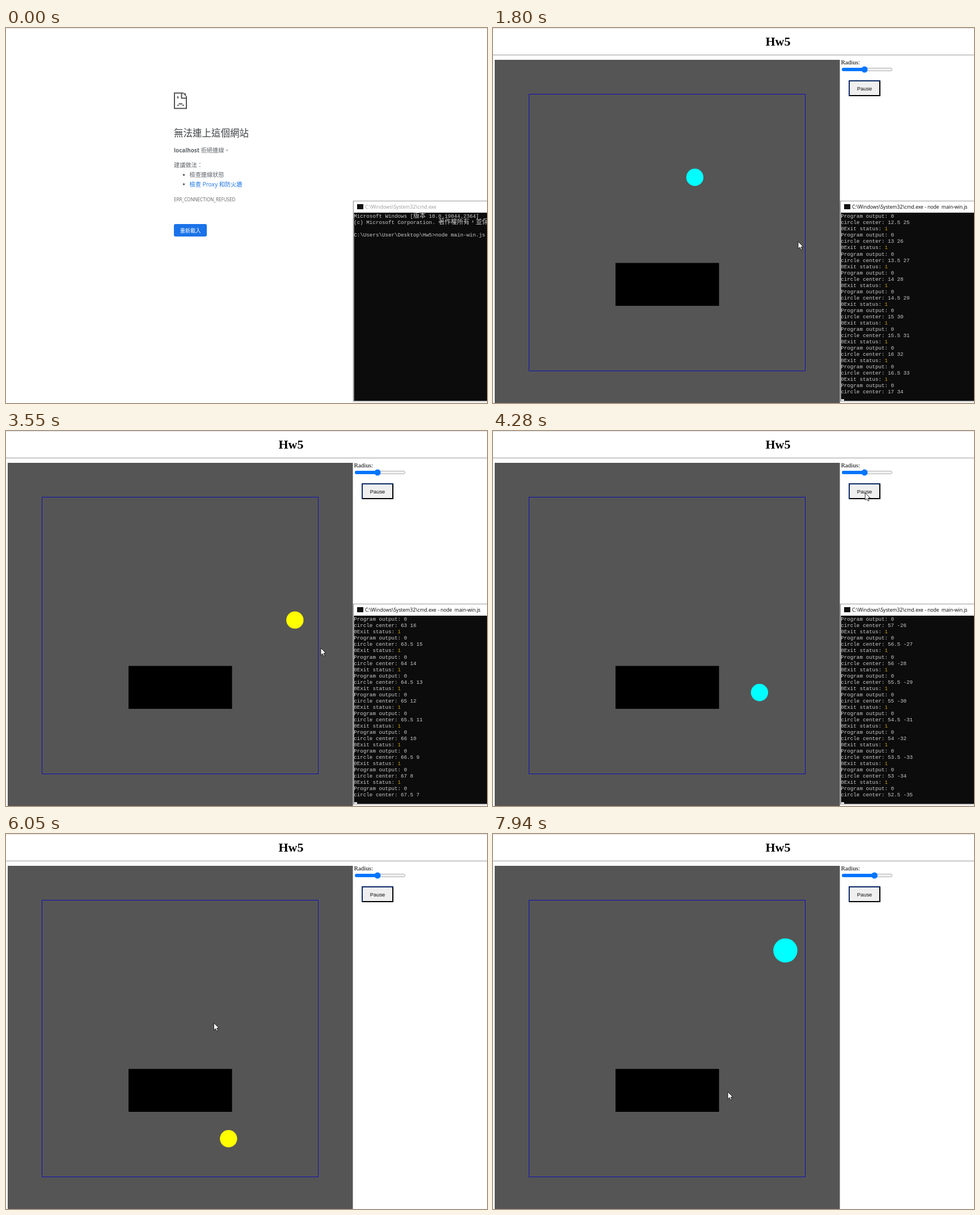
An HTML page for the animation above (8000 ms loop, 848 by 660 pixels).

```html
<!DOCTYPE html>
<html lang="zh-Hant">
<head>
<meta charset="utf-8">
<title>Hw5</title>
<style>
html, body { margin: 0; width: 100%; height: 100%; overflow: hidden; background: #fff; }
svg { display: block; width: 848px; height: 660px; }
text { white-space: pre; }
.ui { font-family: "Open Sans", "Noto Sans CJK TC", "Noto Sans CJK", sans-serif; }
.serif { font-family: "Liberation Serif", serif; }
#error { fill: #5f6368; font-size: 10.2px; }
#rows { font: 9.2px "Liberation Mono", "Noto Sans CJK TC", "Noto Sans CJK", monospace; fill: #ccc; }
</style>
</head>
<body>
<svg viewBox="0 0 848 660">
  <rect width="848" height="660" fill="#fff"/>
  <rect width="848" height="1" fill="#dcdcdc"/>

  <g id="error" class="ui">
    <g fill="none" stroke="#535353" stroke-width="2">
      <path d="M313 114.5H297V141.5H318V119.5M309.5 114V123.5H318M313 116H316V119.5"/>
      <path d="M303 120V124M302 136H304.5M304.5 133.5H311M311 136H313.5"/>
    </g>
    <text x="296" y="191" font-size="16.5" font-weight="300" fill="#3c4043">無法連上這個網站</text>
    <text x="296" y="218.5"><tspan font-weight="700" font-size="9.9">localhost</tspan> 拒絕連線。</text>
    <text x="296" y="245">建議做法：</text>
    <circle cx="313.5" cy="258.5" r="1.8"/>
    <text x="323.5" y="262">檢查連線狀態</text>
    <circle cx="313.5" cy="275" r="1.8"/>
    <text x="323.5" y="278.5" fill="#1a73e8">檢查 Proxy 和防火牆</text>
    <text x="296" y="304.5" font-size="8.1">ERR_CONNECTION_REFUSED</text>
    <rect x="296" y="345" width="58" height="22" rx="3" fill="#1a73e8"/>
    <text x="325" y="359.5" font-size="9.2" font-weight="500" fill="#fff" text-anchor="middle">重新載入</text>
  </g>

  <g id="page">
    <text class="serif" x="502.5" y="31" font-size="22" font-weight="700" text-anchor="middle">Hw5</text>
    <rect y="47" width="848" height="1" fill="#9a9a9a"/>
    <rect x="3" y="56" width="608.5" height="604" fill="#555"/>
    <rect x="63.5" y="116.5" width="487" height="487" fill="none" stroke="#1010b8"/>
    <rect x="216" y="413.5" width="182.5" height="75.5"/>
    <circle id="ball"/>
    <text class="serif" x="613.5" y="63.5" font-size="11">Radius:</text>
    <rect id="track" x="615.5" y="70.5" width="88" height="5" rx="2.5" fill="#efefef" stroke="#b2b2b2"/>
    <rect id="fill" x="615" y="70" height="6" rx="3"/>
    <circle id="thumb" cy="73" r="5.5"/>
    <rect x="628" y="93" width="54" height="26" fill="#efefef" stroke="#000" stroke-width="2"/>
    <path d="M628 120V93H683" fill="none" stroke="#0b2a66" stroke-width="2"/>
    <text id="label" x="655" y="109.7" font-size="9.4" text-anchor="middle" fill="#111" font-family="Liberation Sans, sans-serif"></text>
  </g>

  <g id="console">
    <rect x="611" y="304" width="240" height="355" fill="#000" opacity=".1"/>
    <rect x="612.5" y="304.5" width="240" height="352" fill="#fff" stroke="#999"/>
    <rect x="613.5" y="325" width="240" height="331" fill="#0c0c0c"/>
    <rect x="619" y="310" width="11" height="9" fill="#111"/>
    <text id="title" class="ui" x="633" y="317.8" font-size="8.58"></text>
    <g id="rows"></g>
    <rect id="caret" x="613.5" width="5.5" height="3" fill="#eee"/>
  </g>

  <circle id="click" r="8.5" fill="#ff0" opacity=".6"/>
  <path id="mouse" d="M0 0V12.5L3 9.8 5 14.2 7 13.4 5.1 9H9Z" fill="#fff" stroke="#000" stroke-width=".8"/>
</svg>

<script>
const $ = id => document.getElementById(id);
const set = (id, attrs) => { for (const k in attrs) $(id).setAttribute(k, attrs[k]); };
const show = (id, on) => set(id, { display: on ? 'inline' : 'none' });
const between = (t, a, b) => t >= a && t < b;

const LOOP = 8000, STEP = 17.34, UNIT = 3.04, ROWS = 30, PITCH = 11.035;
const ENTER = 1050, LOAD = 1180, START = 1245, PAUSE = 4523, RESUME = 5408, PAUSED_AT = 189;

// Corners of the ball's path: step, x, y
const path = [[0, 0, 0], [71, 35.5, 71], [141, 70.5, 1], [213, 34.5, -71], [240, 21, -44], [340, 71, 56]];

// Pointer: time, x, y
const pointer = [
  [50, 850, 345], [680, 808, 372], [1050, 808, 372], [1750, 538, 376], [1870, 538, 376],
  [2300, 555, 382], [3580, 555, 382], [4200, 656, 109], [5220, 657, 110], [5420, 657, 110],
  [6000, 376, 330], [6300, 320, 346], [6760, 428, 354], [6950, 426, 437], [7330, 655, 73],
  [7670, 672, 73], [7750, 672, 73], [7940, 414, 454]
];

const header = [
  'Microsoft Windows [<tspan font-size="11">版本</tspan> 10.0.19044.2364]',
  '(c) Microsoft Corporation. <tspan font-size="11">著作權所有，並保留一切權利。</tspan>',
  '',
  'C:\\Users\\User\\Desktop\\Hw5&gt;node main-win.js'
];

function along(points, t) {
  const i = points.findIndex(p => p[0] > t);
  if (i < 0) return points[points.length - 1].slice(1);
  if (!i) return points[0].slice(1);
  const a = points[i - 1], b = points[i], f = (t - a[0]) / (b[0] - a[0]);
  return [a[1] + (b[1] - a[1]) * f, a[2] + (b[2] - a[2]) * f];
}

// The ball moves in half units
const ballAt = n => along(path, n).map(v => Math.round(v * 2) / 2);

function stepAt(t) {
  if (t < PAUSE) return Math.max(0, Math.round((t - START) / STEP));
  return PAUSED_AT + Math.max(0, Math.round((t - RESUME) / STEP));
}

function consoleLines(t) {
  const lines = header.slice();
  if (t < START) return lines;
  const last = stepAt(t) + 2;
  for (let k = 0; k <= last; k++) {
    lines.push('Program output: 0', 'circle center: ' + ballAt(k).join(' '));
    if (k < last) lines.push('0Exit status: <tspan fill="#c19c00">1</tspan>');
  }
  return lines.slice(1 - ROWS);
}

let printed = '';
function drawConsole(t) {
  show('console', t < 4350);
  if (t >= 4350) return;
  const lines = consoleLines(t);
  const markup = lines.map((s, i) => `<text x="613.3" y="${334.3 + i * PITCH}">${s}</text>`).join('');
  if (markup !== printed) $('rows').innerHTML = printed = markup;
  $('title').textContent = 'C:\\Windows\\System32\\cmd.exe' + (t < ENTER ? '' : ' - node  main-win.js');
  set('title', { fill: t < 730 ? '#999' : '#000' });
  show('caret', t >= ENTER);
  set('caret', { y: 333.3 + lines.length * PITCH });
}

function drawPage(t) {
  show('error', t < LOAD);
  show('page', t >= LOAD);
  const n = stepAt(t), [x, y] = ballAt(n);
  const radius = 5 + 2 * Math.min(1, Math.max(0, (t - 7330) / 340));
  const bounces = path.filter(p => p[0] > 0 && p[0] < n).length;
  set('ball', { cx: 307.2 + x * UNIT, cy: 360 - y * UNIT, r: radius * UNIT, fill: bounces % 2 ? '#ff0' : '#0ff' });

  const thumb = 655 + (radius - 5) * 8.75, hover = between(t, 7310, 7760);
  const blue = hover ? '#005cc8' : '#0075ff';
  set('track', { fill: hover ? '#e5e5e5' : '#efefef' });
  set('fill', { width: thumb - 615, fill: blue });
  set('thumb', { cx: thumb, fill: blue });
  $('label').textContent = between(t, 4540, 5340) ? 'Start' : 'Pause';
}

function drawPointer(t) {
  const [x, y] = along(pointer, t);
  show('mouse', t >= 50);
  set('mouse', { transform: `translate(${x} ${y})` });
  show('click', between(t, 730, 870) || between(t, 4400, 4540) || between(t, 5220, 5340));
  set('click', { cx: x, cy: y });
}

function frame() {
  const t = performance.now() % LOOP;
  drawConsole(t);
  drawPage(t);
  drawPointer(t);
  requestAnimationFrame(frame);
}
frame();
</script>
</body>
</html>
```
